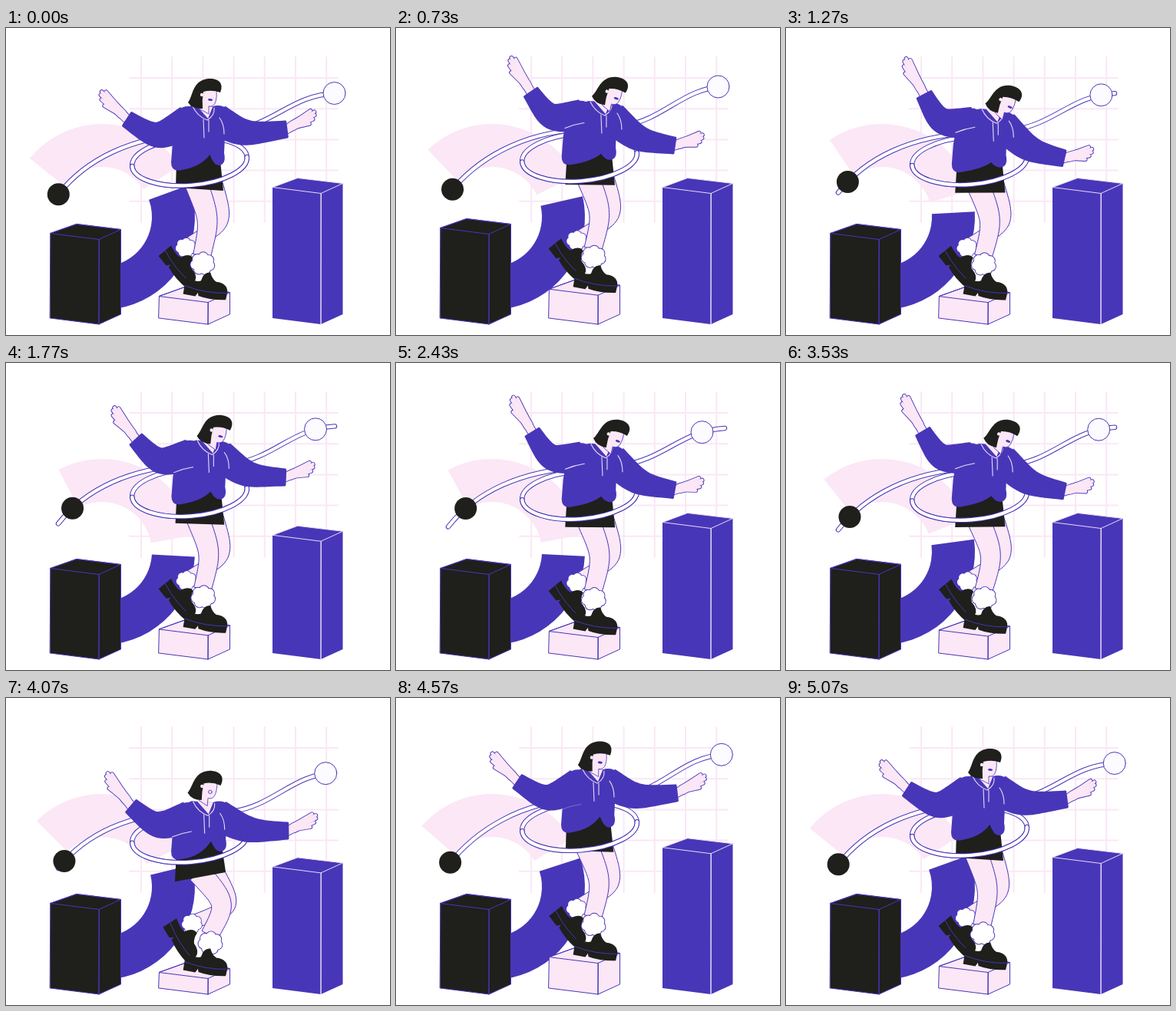
Animation, 500 px wide and 400 px high, one loop 5110 ms. Source, as an HTML page with a canvas:

```html
<!DOCTYPE html>
<html lang="en">
<head>
<meta charset="utf-8">
<title>Hoop balance</title>
<style>
html, body { margin: 0; width: 100%; height: 100%; overflow: hidden; background: #fff; }
canvas { display: block; width: 500px; height: 400px; }
</style>
</head>
<body>
<canvas id="stage"></canvas>
<script>
const LOOP = 5110;
const BLUE = '#4836b8', DARK = '#1f1f1c', PINK = '#fbe7f6', PALE = '#e6dcf6', WHITE = '#fff';
const canvas = document.getElementById('stage');
const ctx = canvas.getContext('2d');
const ratio = window.devicePixelRatio || 1;
canvas.width = 500 * ratio;
canvas.height = 400 * ratio;

// Each part: upright points, shift when leaning, shift when crouching.
const POSE = {
  head: [[260, 86, 0], [30, 9, 18], [-1, 20, 4]],
  neck: [[257, 101], [15, 5], [0, 25]],
  shoulders: [[222, 112, 292, 112], [2, -5, 14, 14], [2, 20, 0, 26]],
  hem: [[215, 181, 285, 179], [1, 3, 3, 3], [0, 17, 2, 13]],
  skirt: [[221, 208, 283, 212], [-1, 8, 3, 3], [-1, 23, 3, 7]],
  leftArm: [[237, 121, 198, 139, 158, 119], [5, 3, 6, -23, 27, -39], [0, 26, 0, 19, 4, 16]],
  leftHand: [[122, 83], [39, -54], [6, 9]],
  rightArm: [[276, 120, 312, 136, 365, 132], [9, 9, 6, 25, -4, 46], [1, 25, 4, 26, 2, 31]],
  rightHand: [[404, 110], [-4, 60], [2, 33]],
  frontLeg: [[248, 203, 262, 250, 255, 297], [2, 0, 4, 1, 2, 1], [3, 16, 18, 10, 10, 4]],
  backLeg: [[270, 203, 277, 252, 234, 284], [2, 0, 3, 0, 2, 0], [2, 16, 10, 10, 8, 0]],
  backShoe: [[227, 309, 48], [0, 0, 0], [4, -3, 7]]
};

const ease = u => { u = Math.max(0, Math.min(1, u)); return u * u * (3 - 2 * u); };
const mix = ([base, a, b], u, v) => base.map((n, i) => n + a[i] * u + b[i] * v);

// Soft cyclic hump: 1 at the centre, 0 beyond the given reach.
function hump(t, centre, reach, period) {
  const d = Math.abs(((t - centre) % period + period * 1.5) % period - period / 2);
  return d < reach ? Math.cos(Math.PI / 2 * d / reach) ** 2 : 0;
}

function motion(t) {
  const wave = (centre, reach) => hump(t, centre, reach, LOOP);
  // Plinths and bobbing follow a beat of half a loop.
  const beat = (2 * t / LOOP) % 1;
  const pulse = (centre, reach) => hump(beat, centre, reach, 1);
  const press = c => pulse(c, 0.11) - pulse(c + 0.13, 0.1) / 2;
  const dip = wave(1900, 1000);
  return {
    dip,
    lean: ease(t / 1200) * (1 - ease((t - 3200) / 1000)) - 0.6 * dip,
    crouch: wave(4070, 650),
    bob: -12 * pulse(0.22, 0.21) + 8 * pulse(0.59, 0.1) - 12 * pulse(0.79, 0.14),
    turn: -20 + 24 * (t < 2000 ? ease(t / 2000) : 1 - ease((t - 2000) / (LOOP - 2000))),
    slide: 33 * wave(2500, 2700),
    black: 14 * press(0.16),
    blue: 26 * press(0.65)
  };
}

function paint(fill, line, width = 1) {
  if (fill) { ctx.fillStyle = fill; ctx.fill(); }
  if (line) { ctx.strokeStyle = line; ctx.lineWidth = width; ctx.stroke(); }
}

function shape(points, fill, line, width) {
  ctx.beginPath();
  points.forEach(([x, y]) => ctx.lineTo(x, y));
  ctx.closePath();
  paint(fill, line, width);
}

function disc(x, y, r, fill, line) {
  ctx.beginPath();
  ctx.arc(x, y, r, 0, 7);
  paint(fill, line);
}

function placed(x, y, deg, size, draw) {
  ctx.save();
  ctx.translate(x, y);
  ctx.rotate(deg * Math.PI / 180);
  ctx.scale(size, size);
  draw();
  ctx.restore();
}

// Tapered limb bent at its middle joint.
function limb([ax, ay, bx, by, cx, cy], [wa, wb, wc], fill, line, width) {
  const kx = (bx - (ax + cx) / 8) / 0.75, ky = (by - (ay + cy) / 8) / 0.75;
  const one = [], two = [];
  for (let i = 0; i <= 24; i++) {
    const u = i / 24, v = 1 - u, k = 3 * u * v;
    const x = v ** 3 * ax + k * kx + u ** 3 * cx;
    const y = v ** 3 * ay + k * ky + u ** 3 * cy;
    const dx = v * v * (kx - ax) + u * u * (cx - kx), dy = v * v * (ky - ay) + u * u * (cy - ky);
    const w = (u < 0.5 ? wa + (wb - wa) * 2 * u : wb + (wc - wb) * (2 * u - 1)) / 2;
    const d = Math.hypot(dx, dy) || 1;
    one.push([x - dy / d * w, y + dx / d * w]);
    two.unshift([x + dy / d * w, y - dx / d * w]);
  }
  shape([...one, ...two], fill, line, width);
}

function grid() {
  ctx.beginPath();
  for (let i = 0; i < 7; i++) { ctx.moveTo(176 + i * 40.2, 38); ctx.lineTo(176 + i * 40.2, 253); }
  for (let i = 0; i < 5; i++) { ctx.moveTo(161, 65 + i * 40.2); ctx.lineTo(432, 65 + i * 40.2); }
  paint(null, PINK, 2);
}

function sector(from, to, fill) {
  const a = from * Math.PI / 180, b = to * Math.PI / 180;
  ctx.beginPath();
  ctx.arc(125, 246, 121, a, b);
  ctx.arc(125, 246, 65, b, a, true);
  ctx.closePath();
  paint(fill);
}

// Box on a fixed base; x of left, front, right and back corners, y of the front corner.
function box(l, f, r, b, top, fill, line) {
  const left = [l, top - 8], front = [f, top], right = [r, top - 13], back = [b, top - 20];
  shape([left, back, right, [r, 373], [f, 386], [l, 378]], fill, line === PALE ? null : line);
  shape([left, front, right, back], null, line);
  shape([front, [f, 386]], null, line);
}

function ribbon() {
  paint(null, BLUE, 6.4);
  paint(null, WHITE, 4.4);
}

function coil(y, to) {
  ctx.beginPath();
  ctx.ellipse(239, y, 75, 31, -0.08, 0, to);
  ribbon();
}

// Draws a rod and returns the point lying `slide` pixels in from its tip.
function rod(a, b, c, d, slide) {
  ctx.beginPath();
  ctx.moveTo(...a);
  ctx.bezierCurveTo(...b, ...c, ...d);
  ribbon();
  const u = slide / (3 * Math.hypot(b[0] - a[0], b[1] - a[1])), v = 1 - u;
  return [0, 1].map(i => v ** 3 * a[i] + 3 * v * v * u * b[i] + 3 * v * u * u * c[i] + u ** 3 * d[i]);
}

function sock(x, y, deg, size) {
  const lobes = [0, 1, 2, 3, 4, 5, 6].map(i => [10 * Math.cos(i * 0.9 + 0.3), 9 * Math.sin(i * 0.9 + 0.3), 6.5]);
  lobes.push([0, 0, 11]);
  placed(x, y, deg, size, () => {
    lobes.forEach(([a, b, r]) => disc(a, b, r + 1, BLUE));
    lobes.forEach(([a, b, r]) => disc(a, b, r, WHITE));
  });
}

function shoe(x, y, deg) {
  placed(x, y, deg, 1, () => {
    ctx.beginPath();
    ctx.moveTo(-27, -8);
    ctx.quadraticCurveTo(-12, -4, -7, -7);
    ctx.quadraticCurveTo(-5, -19, 4, -19);
    ctx.quadraticCurveTo(7, -11, 13, -8);
    ctx.quadraticCurveTo(28, -8, 29, 4);
    ctx.lineTo(28, 14);
    ctx.quadraticCurveTo(8, 17, -8, 13);
    ctx.lineTo(-9, 9);
    ctx.lineTo(-12, 14);
    ctx.lineTo(-28, 13);
    ctx.closePath();
    paint(DARK);
    ctx.beginPath();
    ctx.moveTo(-27, 2);
    ctx.quadraticCurveTo(0, 9, 28, 5);
    paint(null, BLUE, 0.9);
  });
}

function hand(x, y, [tx, ty], side) {
  const len = Math.hypot(tx - x, ty - y);
  const parts = [0.92, 1, 0.96, 0.86].map((r, i) => {
    const across = (i - 1.5) * side;
    return [0.4 * len, across * 2.6, r * len - 2, across * 3.7, 4];
  });
  parts.push([0.25 * len, 3 * side, 0.66 * len, 8.5 * side, 4]);
  parts.push([-5, 0, 0.2 * len, 0, 11], [0.2 * len, 0, 0.46 * len, 0, 12]);
  placed(x, y, Math.atan2(ty - y, tx - x) * 180 / Math.PI, 1, () => {
    for (const [color, extra] of [[BLUE, 1.8], [PINK, 0]]) {
      for (const [a, b, c, d, w] of parts) {
        ctx.beginPath();
        ctx.moveTo(a, b);
        ctx.lineTo(c, d);
        paint(null, color, w + extra);
      }
    }
  });
}

function arm(joints, tip, side) {
  hand(joints[4], joints[5], tip, side);
  disc(joints[0], joints[1], 19, BLUE);
  limb(joints, [38, 31, 20], BLUE, BLUE, 3);
}

function torso([nx, ny], [lx, ly, rx, ry], [ax, ay, bx, by], notch) {
  const w = bx - ax;
  ctx.beginPath();
  ctx.moveTo(nx - 16, ny);
  ctx.quadraticCurveTo(lx, ly, ax + 2, ay - 32);
  ctx.lineTo(ax, ay - 6);
  ctx.quadraticCurveTo(ax, ay + 7, ax + 14, ay + 4);
  ctx.quadraticCurveTo(ax + w * 0.55, ay, ax + w * 0.72, by - notch);
  ctx.quadraticCurveTo(ax + w * 0.8, by + 1, bx - 7, by);
  ctx.quadraticCurveTo(bx + 2, by - 2, bx - 1, by - 16);
  ctx.lineTo(bx, by - 38);
  ctx.quadraticCurveTo(rx, ry, nx + 15, ny + 2);
  ctx.closePath();
  paint(BLUE);
}

function folds([nx, ny], [, , ex, ey], crease) {
  shape([[nx - 9, ny], [nx + 12, ny + 2], [nx + 6, ny + 17]], PINK);
  ctx.beginPath();
  ctx.moveTo(nx - 14, ny + 1);
  ctx.quadraticCurveTo(nx - 8, ny + 14, nx + 5, ny + 19);
  ctx.quadraticCurveTo(nx + 15, ny + 13, nx + 14, ny + 3);
  ctx.moveTo(nx, ny + 18);
  ctx.lineTo(nx + 1, ny + 42);
  ctx.moveTo(nx + 7, ny + 19);
  ctx.lineTo(nx + 7, ny + 34);
  ctx.moveTo(nx + 21, ny + 16);
  ctx.quadraticCurveTo(nx + 27, ny + 24, nx + 27, ny + 37);
  paint(null, PALE, 1.1);
  ctx.globalAlpha = Math.max(0, Math.min(1, crease * 2));
  ctx.beginPath();
  ctx.moveTo(ex + 18, ey + 16);
  ctx.quadraticCurveTo(ex + 30, ey + 11, ex + 43, ey + 9);
  paint(null, PALE, 1.1);
  ctx.globalAlpha = 1;
}

function head([x, y, tilt], lean, open) {
  placed(x, y, tilt, 1, () => {
    ctx.beginPath();
    ctx.moveTo(-6, -8);
    ctx.lineTo(14, -6);
    ctx.quadraticCurveTo(15, 4, 13, 10);
    ctx.quadraticCurveTo(11, 17, 4, 16);
    ctx.lineTo(4, 26);
    ctx.lineTo(-7, 20);
    ctx.closePath();
    paint(PINK, BLUE, 0.8);
    ctx.beginPath();
    ctx.moveTo(-23, 11);
    ctx.bezierCurveTo(-16, 2, -18, -17, 3, -20);
    ctx.bezierCurveTo(17, -21, 24, -14, 19, -2);
    ctx.quadraticCurveTo(8, -6, -3, -3);
    ctx.quadraticCurveTo(-5, 8, -4, 19);
    ctx.quadraticCurveTo(-17, 20, -23, 11);
    paint(DARK);
    disc(-5, 1, 2.2, PINK);
    ctx.beginPath();
    ctx.ellipse(6 + 4 * lean, 7.5, 2.8 - open / 2, 1 + 1.2 * open, 0.1, 0, 7);
    paint(open > 0.5 ? PINK : BLUE, BLUE, 0.9);
  });
}

function figure(m, frontHoop) {
  const part = name => mix(POSE[name], m.lean, m.crouch);
  const raised = draw => placed(0, m.bob, 0, 1, draw);
  const neck = part('neck'), hem = part('hem'), leftArm = part('leftArm');
  raised(() => {
    const front = part('frontLeg'), back = part('backLeg'), [ax, ay, bx, by] = part('skirt');
    limb(back, [24, 23, 17], PINK, BLUE);
    sock(back[4], back[5] + 2, 0, 0.8);
    shoe(...part('backShoe'));
    limb(front, [30, 26, 23], PINK, BLUE);
    sock(front[4] + 1, front[5] + 10, 0, 0.95);
    shoe(260, 337, 7);
    shape([[hem[0] + 7, hem[1] - 8], [hem[2] - 15, hem[3] - 20], [hem[2] - 6, hem[3] - 6], [bx, by], [ax, ay]], DARK);
    torso(neck, part('shoulders'), hem, 14 - 9 * m.lean);
  });
  frontHoop();
  raised(() => {
    arm(leftArm, part('leftHand'), -1);
    arm(part('rightArm'), part('rightHand'), 1);
    folds(neck, leftArm, m.lean + m.crouch);
    head(part('head'), m.lean, m.crouch);
  });
}

function draw(t) {
  ctx.setTransform(ratio, 0, 0, ratio, 0, 0);
  ctx.fillStyle = WHITE;
  ctx.fillRect(0, 0, 500, 400);
  ctx.lineCap = ctx.lineJoin = 'round';
  const m = motion(t);

  grid();
  sector(m.turn - 121, m.turn - 13.5, PINK);
  sector(m.turn, 100, BLUE);
  box(57.5, 121, 149.5, 92, 275.5 + m.black, DARK, BLUE);
  box(347, 410, 438.5, 380, 215.5 + m.blue, BLUE, PALE);
  box(199, 263, 291.5, 233, 357.5 + m.bob, PINK, BLUE);

  const hoopY = 174 + 0.6 * m.bob + 4 * m.crouch - 4 * m.dip;
  const leftY = 217 + 5 * m.crouch - 8 * m.dip;
  const rightY = 85 + m.bob + 4 * m.crouch;
  const innerY = 133 + 0.6 * m.bob + 10 * m.crouch;
  const dark = rod([68, leftY], [104, leftY - 46], [163, hoopY - 32], [240, hoopY - 36], m.slide);
  const light = rod([428, rightY], [372, rightY + 3], [350, innerY - 8], [295, innerY], m.slide);
  coil(hoopY, 2 * Math.PI);
  figure(m, () => coil(hoopY, Math.PI));

  disc(...dark, 14.5, DARK);
  disc(...light, 14.5, '#fcfbff', BLUE);
}

const start = performance.now();
function tick() {
  draw((performance.now() - start) % LOOP);
  requestAnimationFrame(tick);
}
tick();
</script>
</body>
</html>
```
